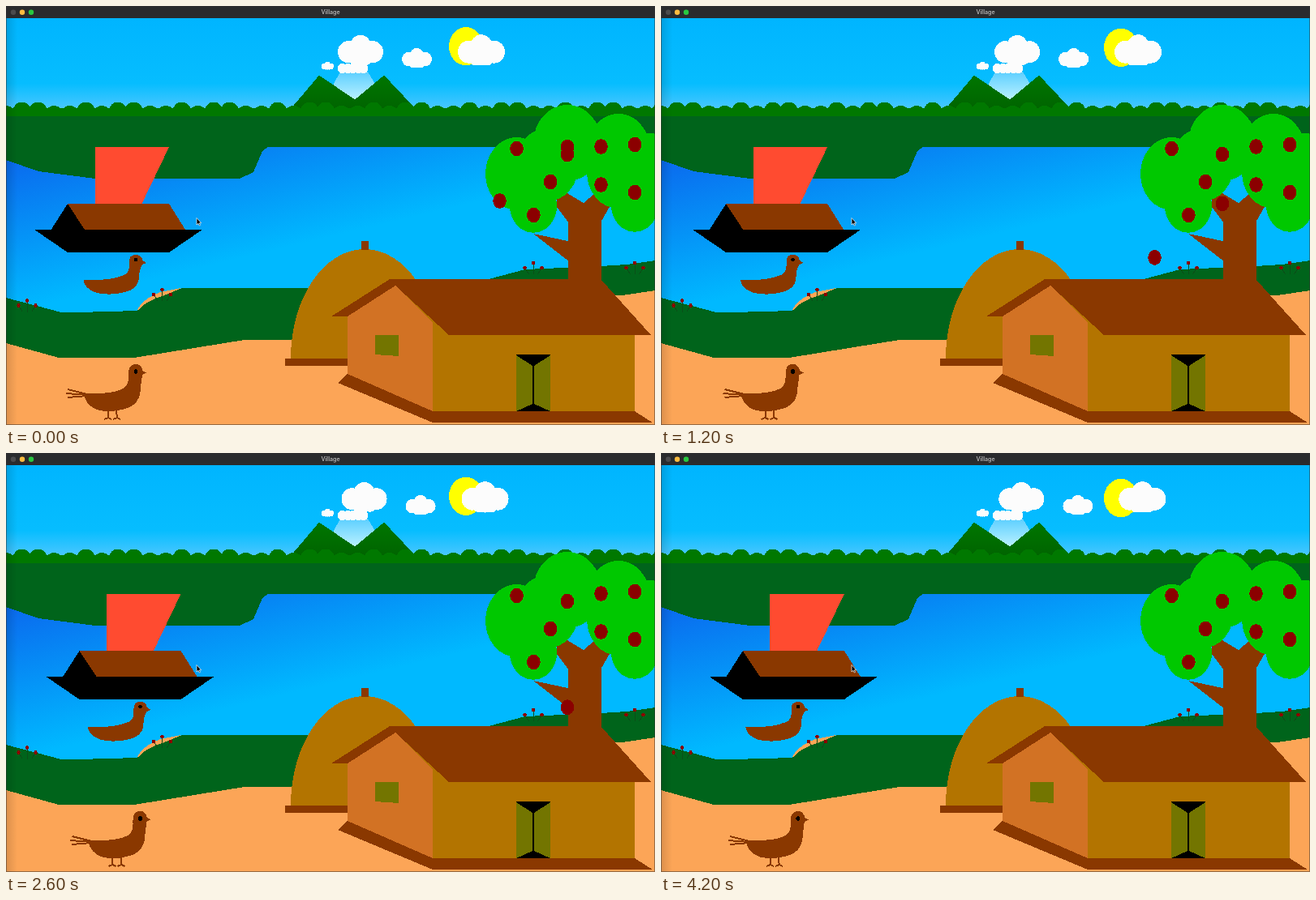
An HTML page that plays this animation: 800 px wide and 517 px high, repeating every 4.4 s.

```html
<!DOCTYPE html>
<html lang="en">
<head>
<meta charset="utf-8">
<title>Village</title>
<style>
  html, body { margin: 0; width: 100%; height: 100%; overflow: hidden; background: #fca557; }
  svg { display: block; width: 800px; height: 517px; }
  .wood { fill: #8a3800; }
  .ochre { fill: #b37400; }
  .olive { fill: #737500; }
  .sand { fill: #fca557; }
  .grass { fill: #00641b; }
  .apple { fill: #8b0000; }
  .cloud { fill: #fcfcfc; }
</style>
</head>
<body>
<svg viewBox="0 0 800 517" shape-rendering="crispEdges">
  <defs>
    <linearGradient id="sky" x2="0" y2="1">
      <stop offset="0" stop-color="#00b5ff"/>
      <stop offset=".7" stop-color="#06bdff"/>
      <stop offset="1" stop-color="#50c8ff"/>
    </linearGradient>
    <linearGradient id="water" gradientUnits="userSpaceOnUse" x1="0" y1="190" x2="43" y2="370">
      <stop offset="0" stop-color="#0a6aee"/>
      <stop offset="1" stop-color="#00b9ff"/>
    </linearGradient>
    <linearGradient id="steam" x2="0" y2="1">
      <stop offset="0" stop-color="#5ccfff"/>
      <stop offset="1" stop-color="#b8f0ff"/>
    </linearGradient>
    <linearGradient id="hill" x2="0" y2="1">
      <stop offset="0" stop-color="#007600"/>
      <stop offset="1" stop-color="#006400"/>
    </linearGradient>
    <linearGradient id="edge">
      <stop offset="0" stop-opacity=".13"/>
      <stop offset="1" stop-opacity="0"/>
    </linearGradient>
  </defs>

  <rect y="15" width="800" height="115" fill="url(#sky)"/>
  <ellipse id="sun" cx="567" cy="49.700" rx="21" ry="23.700" fill="#ff0"/>
  <path fill="url(#steam)" d="M412 81H446L466 115H394Z"/>
  <path fill="url(#hill)" d="M350 128L386 85.500 430 115.500 466 85.500 506 128Z"/>
  <g id="puffs" class="cloud"/>
  <g id="clouds" class="cloud"/>
  <g id="woods" fill="#007800"><rect y="126" width="800" height="10.500"/></g>

  <rect y="136" width="800" height="260" fill="url(#water)"/>
  <path class="grass" d="M0 136H800V174H323L316 179 305 205 288 213H110L40 204 0 190Z"/>

  <path class="sand" d="M0 400H162V375Q168 362 190 353L215 348V400H800V517H0Z"/>
  <path class="sand" d="M560 350H800V420H560Z"/>
  <path class="grass" d="M0 360L70 378.500 162 376Q172 364 195 357L217 348H440V411.500H297L158 434H65L0 416Z"/>
  <path class="grass" d="M595 337L640 325 733 321 765 319 800 314V351L760 357H595Z"/>
  <g id="flowers"/>

  <g id="boat">
    <path fill="#ff4b30" d="M109.500 174H201L167 245H109.500Z"/>
    <path d="M76 244L98 277H55ZM35 276H242L201 304H76Z"/>
    <path class="wood" d="M76 244H201L221 276H97Z"/>
  </g>

  <g id="swimmer">
    <path class="wood" d="M95.500 338Q128 339 142 333Q153 331 152 317Q151 307 160 307Q167 307 168.500 314L173 317 168 319Q164 326 164 334Q164 347 150 352Q130 358 112 354Q97 349 95.500 338Z"/>
    <ellipse cx="160" cy="313" rx="2.500" ry="2"/>
  </g>
  <g id="walker">
    <path class="wood" d="M96 478Q130 479 142 473Q152 470 151 454Q151 442 160 442Q167 442 168.500 450L173 452.500 168 455L166 470Q166 490 150 496Q132 502 115 499Q98 494 96 478Z"/>
    <path fill="none" stroke="#8a3800" stroke-width="2" d="M76 473L100 479M74 478L100 480M76 483L100 481M126 499V509M121 510L126 508 130 510M136 499L137 509M132 510L137 508 141 510"/>
    <ellipse cx="160" cy="451" rx="2.500" ry="2.800"/>
  </g>

  <path class="ochre" d="M351 435A91 135 0 0 1 533 435Z"/>
  <path class="wood" d="M437.500 290H446.500V301H437.500ZM344 435H430V444H344Z"/>

  <path class="wood" d="M692.500 340V314L650 281 692.500 290V266L679 248V236L692 231 712 243 725 232H738L745 246 733.500 266V340Z"/>
  <g id="leaves" fill="#00c800"/>
  <g id="apples" class="apple"/>
  <g id="falling" class="apple"/>

  <path fill="#d27224" d="M421 383L480 345 526 390V500L421 455Z"/>
  <path class="ochre" d="M526 388H775V500H526Z"/>
  <path class="wood" d="M473 337H733L795 406H546L480 345 421 383H401Z"/>
  <path class="wood" d="M421 454L526 500H775L797 514H526L409 465Z"/>
  <path class="olive" d="M455 406H484V432L455 430Z"/>
  <path d="M629 430H671V500H629Z"/>
  <path class="olive" d="M629 431L649 444V491L629 500ZM671 431L651 444V491L671 500Z"/>

  <rect y="15" width="14" height="502" fill="url(#edge)"/>
  <g shape-rendering="auto">
    <path stroke="#fff" stroke-width=".7" d="M235 261.500V270L237 268.300 238.300 271 239.500 270.400 238.300 267.800H240.700Z"/>
    <rect width="800" height="15" fill="#2a2b2d"/>
    <g id="buttons"/>
    <text x="400" y="10.200" text-anchor="middle" font-family="Inter, sans-serif" font-size="7" font-weight="600" fill="#b4b4b4">Village</text>
    <rect x=".5" y=".5" width="799" height="516" fill="none" stroke="#333" opacity=".5"/>
  </g>
</svg>

<script>
const el = id => document.getElementById(id);
const add = (id, markup) => el(id).insertAdjacentHTML('beforeend', markup);
const ellipse = (x, y, rx, ry = rx * 1.13) =>
  `<ellipse cx="${x}" cy="${y}" rx="${rx}" ry="${ry}"/>`;
const apple = ([x, y]) => ellipse(x, y, 8.3, 9.4);
const sides = [-1, 0, 1];

// Three lobes on top, two below; size is half the width.
const cloud = (x, y, size) => sides.map(d =>
  ellipse(x + d * .54 * size, y + (d ? .06 : -.2) * size, .46 * size, .48 * size) +
  ellipse(x + d * .25 * size, y + .3 * size, .3 * size)).join('');

add('clouds', cloud(437, 55, 28) + cloud(506.5, 64.5, 18.5) + cloud(586, 55, 29));
add('puffs', cloud(396.5, 74, 7.5));
for (let i = 0; i < 5; i++) add('puffs', ellipse(414.5 + i * 6.6, 77, 5.5));

// Low bushes everywhere, with three taller ones in each stretch of six.
for (let i = 0; i < 42; i++) {
  const tall = [1, 2, 5].includes(i % 6);
  add('woods', ellipse(i * 19.7, 131, tall ? 11.5 : 10, tall ? 12.5 : 8));
}

const crowns = [[630, 207], [667, 196], [755, 178], [755, 205], [793, 202]];
add('leaves', crowns.map(([x, y]) => ellipse(x, y, 39, 45)).join('') +
  ellipse(692, 169, 42, 47) + ellipse(650, 247, 29) + ellipse(775, 246, 29));

// Apples hang on a grid of half-crown steps.
const hanging = [[0, 0], [3, 0], [5, 0], [7, 0], [2, 2], [5, 2], [1, 4], [7, 2]];
add('apples', hanging.map(([col, row]) => apple([
  629.5 + col * 20.8,
  (col === 0 ? 176 : col === 3 ? 183 : col === 7 ? 171 + row * 6 : 173.5) + (row ? (col === 2 ? 43.5 : col === 5 ? 47 : col === 1 ? 84.5 : 47) : 0)
])).join(''));

for (const [x, y] of [[26, 363.5], [192.5, 350], [650, 317], [775, 317]])
  for (const d of sides) {
    const px = x + d * 10.5, py = y + Math.abs(d) * 6;
    add('flowers', `<path stroke="#0a4f18" d="M${px} ${py}L${x + d * 5.5} ${y + 14}"/>
      <g class="apple">${ellipse(px, py, 2.2)}</g>`);
  }

['#4b4b4d', '#fdbc40', '#28c840'].forEach((color, i) =>
  add('buttons', `<circle cx="${9 + i * 11}" cy="7.7" r="3.2" fill="${color}"/>`));

const shift = (id, x, y = 0) => el(id).setAttribute('transform', `translate(${x} ${y})`);

function draw() {
  const tick = Math.floor(performance.now() / 200) % 22;
  const drop = 23.3 * Math.max(Math.min(tick, 1), tick >> 1);
  shift('sun', 0, tick * .28);
  shift('clouds', tick * .35);
  shift('swimmer', tick * .42);
  shift('walker', tick * .42);
  shift('boat', 2.07 * Math.max(0, Math.floor(tick * .65 - 1.4)));
  // Apples vanish once they reach the ground.
  el('falling').innerHTML = [[608.5, 240.5], [692, 174]]
    .map(([x, y]) => [x, y + drop])
    .filter(([, y]) => y < 340)
    .map(apple).join('');
  requestAnimationFrame(draw);
}
draw();
</script>
</body>
</html>
```
